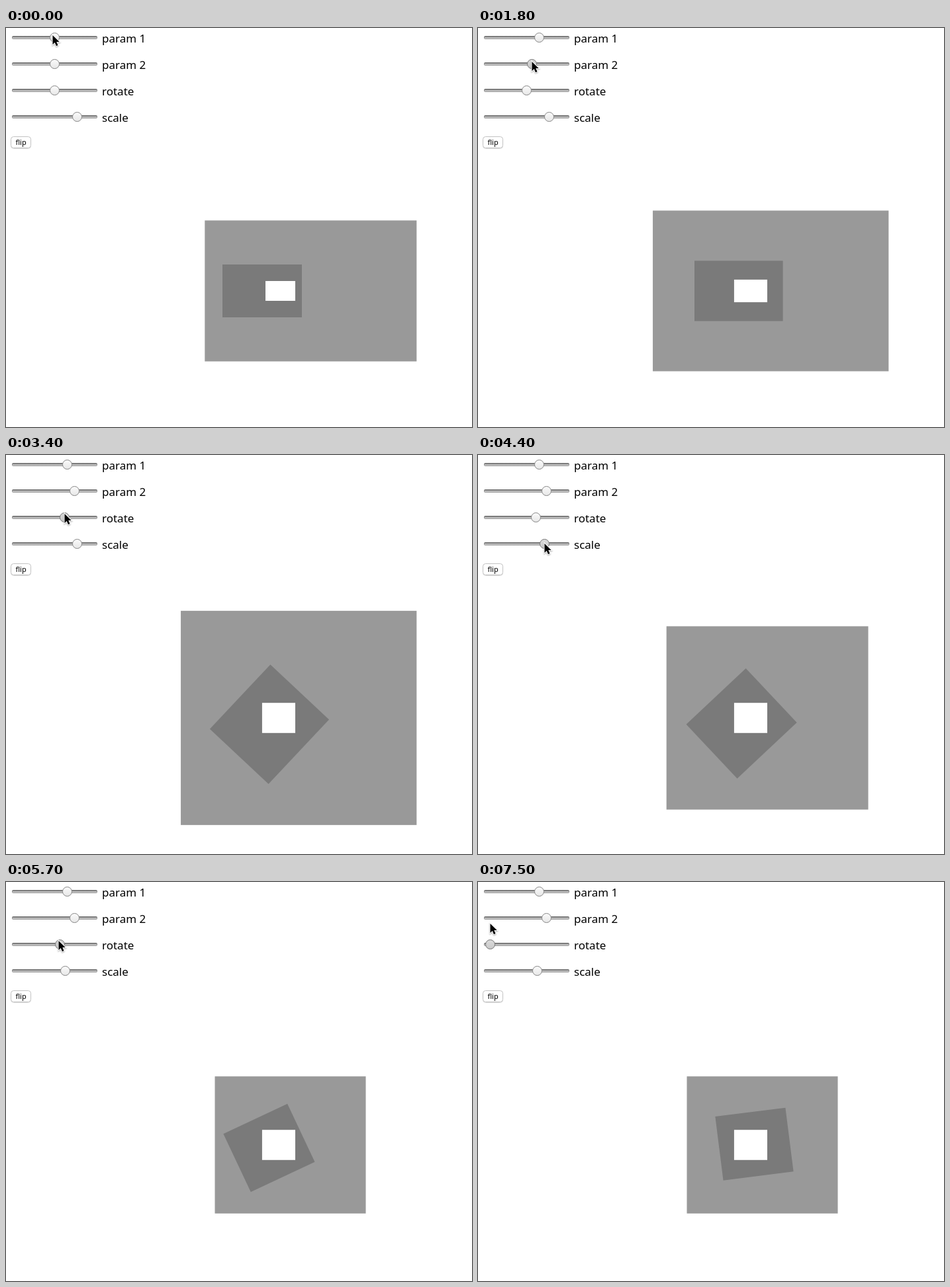
An HTML page with a canvas that plays this animation: 704x604 px, repeating every 7.7 s.

```html
<!DOCTYPE html>
<html lang="en">
<head>
<meta charset="utf-8">
<title>Nested rectangles</title>
<style>
  html, body { margin: 0; width: 100%; height: 100%; overflow: hidden; background: #fff; }
  canvas { display: block; }
</style>
</head>
<body>
<canvas id="stage" width="704" height="604"></canvas>
<script>
const ctx = document.getElementById('stage').getContext('2d');
const LOOP = 7700, STEP = 100;
const PIVOT = { x: 407, y: 398 };

// keys: [ms, percent]; held: spans in which the thumb is pressed
const sliders = [
  { label: 'param 1', keys: [[300, 50], [1100, 67]], held: [[200, 1100]] },
  { label: 'param 2', keys: [[1700, 50], [2100, 76]], held: [[1700, 2100]] },
  { label: 'rotate',
    keys: [[2700, 50], [3200, 62], [3300, 62], [3400, 63], [3600, 62], [5500, 62],
           [5700, 57], [6500, 27], [7300, 5], [7400, 3], [7500, 2]],
    held: [[2700, 3600], [5500, LOOP]] },
  { label: 'scale', keys: [[4200, 80], [4700, 66], [4900, 64]], held: [[4200, 4900]] }
];

const cursorKeys = [
  [0, 70, 11], [200, 74, 13], [300, 74, 13], [1100, 93, 13], [1500, 73, 50],
  [1700, 74, 51], [2100, 103, 51], [2500, 73, 89], [2700, 73, 89], [3200, 87, 89],
  [3400, 88, 89], [3600, 87, 90], [4100, 107, 131], [4200, 107, 132], [4700, 90, 137],
  [4900, 88, 137], [5400, 87, 92], [5500, 87, 92], [6500, 47, 78], [7300, 22, 64], [7500, 18, 63]
];

function valueAt(keys, t, column = 1) {
  const next = keys.findIndex(key => key[0] > t);
  if (next === 0) return keys[0][column];
  if (next < 0) return keys[keys.length - 1][column];
  const a = keys[next - 1], b = keys[next];
  return a[column] + (b[column] - a[column]) * (t - a[0]) / (b[0] - a[0]);
}

function verticalGradient(top, bottom, from, to) {
  const g = ctx.createLinearGradient(0, top, 0, bottom);
  g.addColorStop(0, from);
  g.addColorStop(1, to);
  return g;
}

function roundRect(x, y, w, h, r) {
  ctx.beginPath();
  ctx.roundRect(x, y, w, h, r);
}

function text(string, x, y, size) {
  ctx.font = `${size}px "Noto Sans", sans-serif`;
  ctx.fillStyle = '#000';
  ctx.fillText(string, x, y);
}

function drawSlider(label, top, percent, pressed) {
  roundRect(9, top + 12, 129, 5, 2);
  ctx.fillStyle = verticalGradient(top + 12, top + 17, '#707070', '#a8a8a8');
  ctx.fill();
  ctx.fillStyle = '#bdbdbd';
  ctx.fillRect(10, top + 14, 127, 2);

  ctx.beginPath();
  ctx.arc(Math.round(9 + 1.14 * percent) + 7.5, top + 14.5, 7, 0, 2 * Math.PI);
  ctx.fillStyle = pressed
    ? verticalGradient(top + 7, top + 22, '#dcdcdc', '#c8c8c8')
    : verticalGradient(top + 7, top + 22, '#fcfcfc', '#e6e6e6');
  ctx.fill();
  ctx.strokeStyle = pressed ? '#757575' : '#858585';
  ctx.lineWidth = 1;
  ctx.stroke();
  text(label, 145, top + 22, 17);
}

function drawButton() {
  roundRect(7.5, 165.5, 30, 17, 4);
  ctx.strokeStyle = '#d8d8d8';
  ctx.lineWidth = 1;
  ctx.stroke();
  roundRect(7.5, 164.5, 30, 17, 4);
  ctx.fillStyle = '#fff';
  ctx.fill();
  ctx.strokeStyle = '#c2c2c2';
  ctx.stroke();
  text('flip', 14.5, 177, 11);
}

function drawBox(w, h, scale, degrees, color) {
  ctx.save();
  ctx.translate(PIVOT.x, PIVOT.y);
  ctx.rotate(degrees * Math.PI / 180);
  ctx.scale(scale, scale);
  ctx.fillStyle = color;
  ctx.fillRect(30 - w, -h / 2, w, h);
  ctx.restore();
}

function drawCursor(x, y) {
  const arrow = new Path2D('M0 0V14L3.2 11L5.5 16.2L8 15.1L5.8 10.1H10.2Z');
  ctx.save();
  ctx.translate(x + 0.5, y);
  ctx.shadowColor = 'rgba(0,0,0,.35)';
  ctx.shadowBlur = 2;
  ctx.shadowOffsetY = 1;
  ctx.strokeStyle = '#fff';
  ctx.lineWidth = 2;
  ctx.stroke(arrow);
  ctx.shadowColor = 'transparent';
  ctx.fillStyle = '#000';
  ctx.fill(arrow);
  ctx.restore();
}

function draw(t) {
  ctx.fillStyle = '#fff';
  ctx.fillRect(0, 0, 704, 604);

  const percents = sliders.map(s => Math.round(valueAt(s.keys, t)));
  sliders.forEach((s, i) => {
    const pressed = s.held.some(([from, to]) => t >= from && t <= to);
    drawSlider(s.label, i * 40, percents[i], pressed);
  });
  drawButton();

  const w = 30 + 0.3 * percents[0];
  const h = 0.6 * percents[1];
  const turn = 180 + 3.6 * (50 - percents[2]);
  const scale = percents[3] / 30;
  drawBox(w, h, scale * scale, 0, '#999');
  drawBox(w, h, scale, turn, '#7a7a7a');
  drawBox(w, h, 1, 0, '#fff');

  drawCursor(Math.round(valueAt(cursorKeys, t, 1)), Math.round(valueAt(cursorKeys, t, 2)));
}

const start = performance.now();
function tick() {
  const elapsed = (performance.now() - start) % LOOP;
  draw(Math.floor(elapsed / STEP) * STEP);
  requestAnimationFrame(tick);
}
tick();
</script>
</body>
</html>
```
